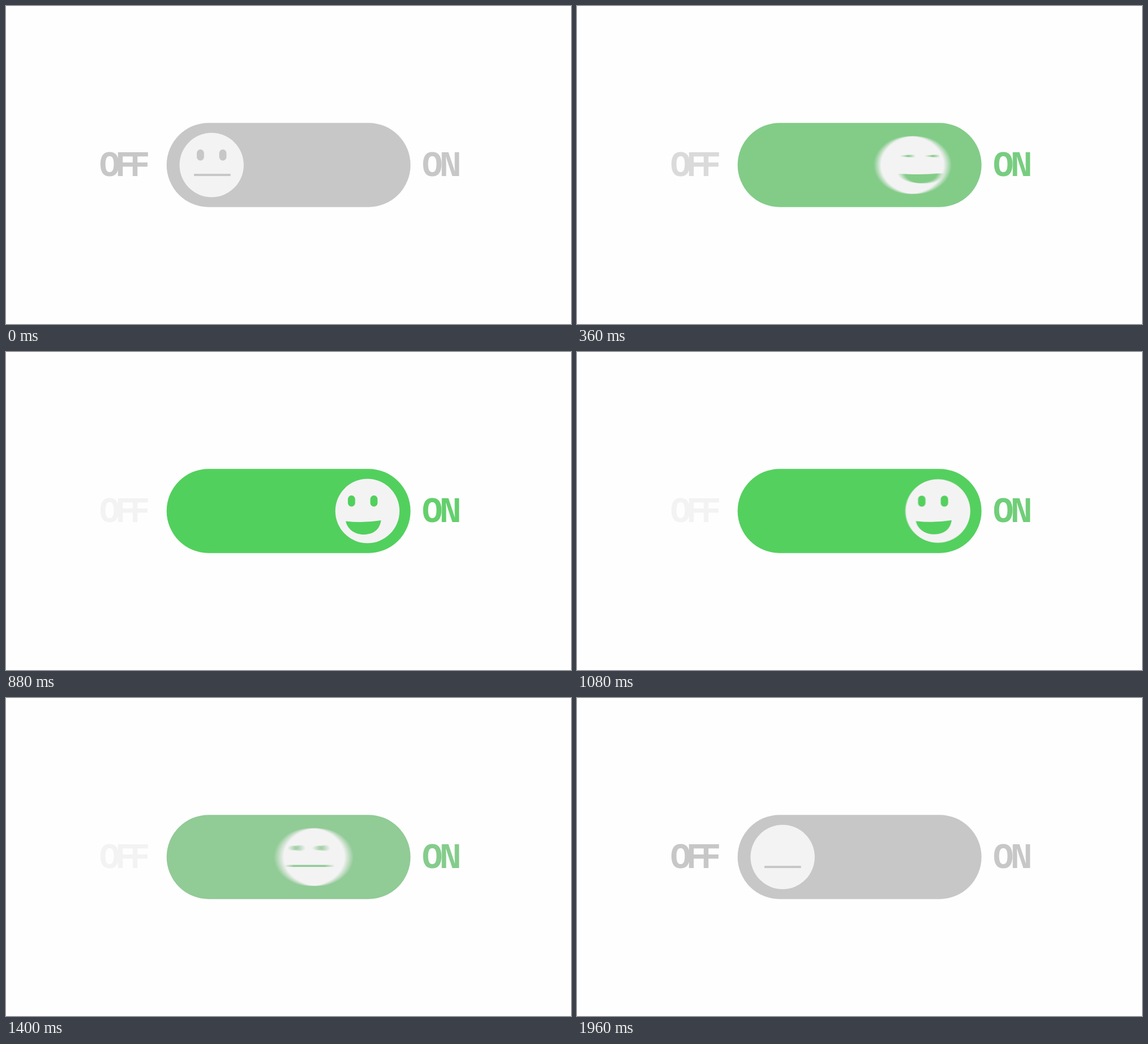
These frames come from a looping animation (998 px wide and 561 px high, 2000 ms). An HTML page with a canvas:

```html
<!DOCTYPE html>
<html lang="en">
<head>
<meta charset="utf-8">
<title>Toggle</title>
<style>
  html, body { margin: 0; width: 100%; height: 100%; overflow: hidden; background: #fefefe; }
  canvas, svg { position: absolute; left: 0; top: 0; }
  text {
    font: 900 60px "Noto Sans Mono", "DejaVu Sans Mono", monospace;
    font-stretch: extra-condensed;
    text-anchor: middle;
    fill: currentColor;
  }
</style>
</head>
<body>
<canvas id="stage" width="998" height="561"></canvas>
<svg width="998" height="561">
  <text id="off" x="183 211 237" y="299.5">OFF</text>
  <text id="on" x="753 785" y="299.5">ON</text>
</svg>
<script>
const LOOP = 2000, STEP = 40, SHUTTER = 20, SAMPLES = 12;
const $ = id => document.getElementById(id);
const stage = $('stage').getContext('2d');
const layer = document.createElement('canvas');
layer.width = 998;
layer.height = 561;
const ctx = layer.getContext('2d');

const mix = (a, b, k) => a + (b - a) * k;
const rgb = (...c) => `rgb(${c.map(Math.round)})`;
const green = k => rgb(mix(199, 82, k), mix(199, 208, k), mix(199, 93, k));

// Smooth rise from 0 to 1 between two times
function ease(t, from, to) {
  const u = Math.min(1, Math.max(0, (t - from) / (to - from)));
  return u * u * (3 - 2 * u);
}

// Slides right, then drifts back a little before the return slide
const knobX = t => 363.2 + 275.2 * ease(t, 30, 475) - 27 * ease(t, 1060, 1240) - 248.2 * ease(t, 1270, 1650);
const squash = t => ease(t, 40, 120) - ease(t, 400, 520) + ease(t, 1060, 1160) - ease(t, 1580, 1680);
const gaze = t => 13.7 * ease(t, 60, 240) - 22 * ease(t, 300, 700) + 7.3 * ease(t, 1440, 1600);
const eyes = t => 1 - ease(t, 160, 320) + ease(t, 320, 460) - ease(t, 1320, 1480);
const smile = t => ease(t, 80, 500) - ease(t, 1100, 1380);
const trackGreen = t => ease(t, 0, 640) - ease(t, 1020, 1740);
const onGreen = t => .95 * ease(t, 0, 560) - .25 * ease(t, 560, 1280) - .7 * ease(t, 1240, 1800);
const offGrey = t => 199 + 44 * (ease(t, 0, 800) - ease(t, 1420, 1960));

function pill(x, y, w, h) {
  ctx.beginPath();
  ctx.roundRect(x, y, w, h, Math.min(w, h) / 2);
  ctx.fill();
}

// A flat bar that opens into a grin as m goes from 0 to 1
function drawMouth(m) {
  const a = mix(32.3, 31.2, m), low = mix(19.5, 41.5, m), bend = mix(19.5, 36, m);
  const left = mix(15.5, 18, m), right = mix(15.5, 16.5, m);
  const edge = 4 * Math.max(0, 1 - 4 * m);
  ctx.beginPath();
  ctx.moveTo(-a, left);
  ctx.quadraticCurveTo(0, mix(15.5, 21.7, m), a, right);
  ctx.lineTo(a, right + edge);
  ctx.bezierCurveTo(a - 3, bend, 14, low, 0, low);
  ctx.bezierCurveTo(-14, low, 3 - a, bend - 3 * m, -a, left + edge);
  ctx.fill();
}

function drawToggle(t, color) {
  ctx.fillStyle = '#fefefe';
  ctx.fillRect(0, 0, 998, 561);
  ctx.fillStyle = color;
  pill(283.7, 206.2, 430.8, 148.5);

  ctx.save();
  ctx.translate(knobX(t), 280.5);
  ctx.scale(1 + .1 * squash(t), 1 - .1 * squash(t));
  ctx.fillStyle = '#f3f3f3';
  pill(-56.7, -56.7, 113.4, 113.4);
  ctx.fillStyle = color;
  ctx.translate(gaze(t), 0);
  const h = 19.6 * eyes(t);
  if (h > .1) for (const x of [-19.8, 19.8]) pill(x - 6.4, -17.6 - h / 2, 12.8, h);
  ctx.translate(1.2, 0);
  drawMouth(smile(t));
  ctx.restore();
}

function render(t) {
  const color = green(trackGreen(t));
  const from = t - SHUTTER / 2, to = t + SHUTTER / 2;
  const travel = Math.abs(knobX(to) - knobX(from)) + Math.abs(gaze(to) - gaze(from));
  const count = travel > .5 ? SAMPLES : 1;
  // Running average of the samples gives motion blur
  for (let i = 0; i < count; i++) {
    drawToggle(count > 1 ? mix(from, to, (i + .5) / count) : t, color);
    stage.globalAlpha = 1 / (i + 1);
    stage.drawImage(layer, 0, 0);
  }
  const grey = offGrey(t);
  $('off').style.color = rgb(grey, grey, grey);
  $('on').style.color = green(onGreen(t));
}

const start = performance.now();
function tick() {
  const t = (performance.now() - start) % LOOP;
  render(Math.floor(t / STEP) * STEP);
  requestAnimationFrame(tick);
}
tick();
</script>
</body>
</html>
```
